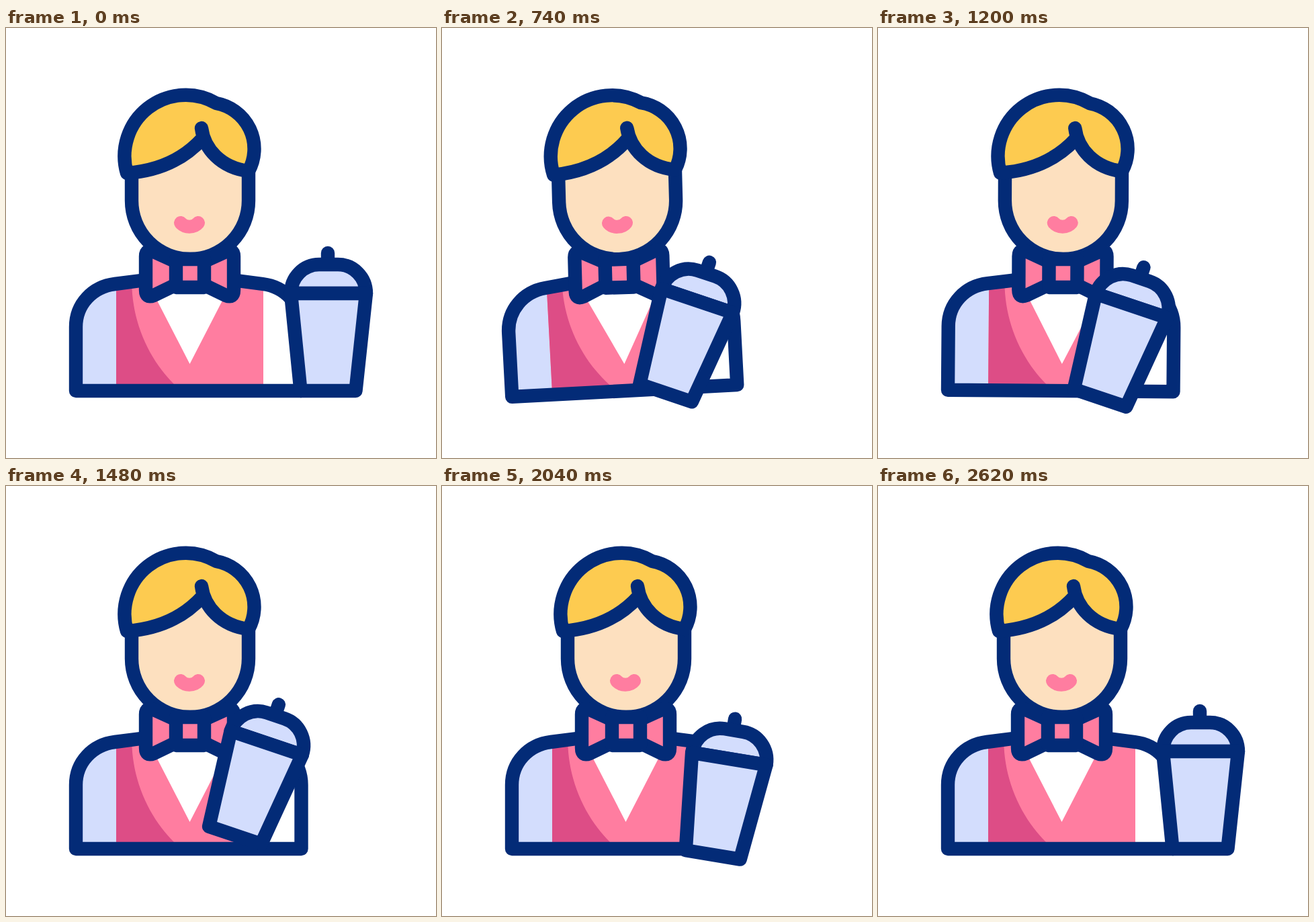
These frames come from a looping animation (640 px wide and 640 px high, 2800 ms). An HTML page:

```html
<!DOCTYPE html>
<html lang="en">
<head>
<meta charset="utf-8">
<title>Bartender</title>
<style>
  html, body { margin: 0; height: 100%; overflow: hidden; background: #fff; }
  svg { display: block; width: 100vw; height: 100vh; }
  path { fill: none; }
  .line { stroke: #032b77; stroke-width: 20.4; stroke-linecap: round; stroke-linejoin: round; }
  .white { fill: #fff; }
  .ice { fill: #d3ddfd; }
  .pink { fill: #ff7da0; }
  .plum { fill: #dd4d86; }
  .skin { fill: #fde0bf; }
  .blond { fill: #fdcb50; }
  .lips { stroke: #ff7da0; stroke-width: 20; stroke-linecap: round; }
</style>
</head>
<body>
<svg viewBox="0 0 640 640">
  <defs>
    <path id="wing" class="line pink" d="M253 348L220 333Q208 328 208 340V390Q208 403 220 398L253 382"/>
    <path id="torso" d="M104 540V445C104 411 129 385 162 381L208 375H336L382 381C415 385 439.500 411 439.500 445V540Z"/>
    <clipPath id="inside">
      <path d="M104 540V445C104 411 129 385 162 381L208 375H336L382 381C415 385 439.500 411 439.500 445V540Z"/>
    </clipPath>
  </defs>

  <g id="body">
    <g clip-path="url(#inside)">
      <path class="white" d="M90 360H450V550H90Z"/>
      <path class="ice" d="M90 360H164V550H90Z"/>
      <path class="pink" d="M164 360H383V550H164Z"/>
      <path class="plum" d="M164 360H187.500V388C190 440 212 492 250 530L260 540H164Z"/>
      <path class="white" d="M204 365L273.500 500L343 365Z"/>
    </g>
    <use href="#torso" class="line"/>

    <g id="head">
      <path class="skin" d="M187 215L292 155L361 215V257A87 87 0 0 1 187 257Z"/>
      <path class="line" d="M187 215V257A87 87 0 0 0 361 257V215"/>
      <path class="lips" d="M260 290C266 297.500 280 297.500 286 290"/>
      <path class="blond" d="M180 216A91 91 0 0 1 313 112A69 69 0 0 1 361 213C320 208 300 185 292 165Q250 211 180 216Z"/>
      <path class="line" d="M291 149C295 180 320 208 361 213A69 69 0 0 0 313 112A91 91 0 0 0 180 216Q250 211 292 165"/>
      <use href="#wing"/>
      <use href="#wing" transform="matrix(-1 0 0 1 547 0)"/>
      <path class="line pink" d="M253 344H295V386H253Z"/>
    </g>
  </g>

  <g id="shaker">
    <path class="line" d="M479 335V350"/>
    <path class="line ice" d="M424 395A42 43 0 0 1 466 352H494A42 43 0 0 1 536 395Z"/>
    <path class="line ice" d="M424 395L438.500 540H520.500L536 395Z"/>
  </g>
</svg>
<script>
const LOOP = 2800;
const part = id => document.getElementById(id);
const body = part('body'), head = part('head'), shaker = part('shaker');

// Each track is a list of [time, value]; values ease in and out between keys.
const lean = [[280, 0], [550, -3.5], [690, -3.5], [940, 1.3], [1370, 0]];
const reach = [[280, 0], [740, 1], [1760, 1], [2325, 0]];
const hop = [[2220, 0], [2420, 79], [2620, 0]];
const shake = [[740, 0]];
for (let i = 0; i < 8; i++) shake.push([836 + 112 * i, i % 2 ? -15 : 31]);
shake.push([1760, -15], [2325, 0]);

function at(track, t) {
  const next = track.findIndex(key => key[0] > t);
  if (next === 0) return track[0][1];
  if (next < 0) return track[track.length - 1][1];
  const [t0, v0] = track[next - 1], [t1, v1] = track[next];
  const k = (1 - Math.cos(Math.PI * (t - t0) / (t1 - t0))) / 2;
  return v0 + (v1 - v0) * k;
}

function draw(t) {
  const tilt = at(lean, t);
  body.setAttribute('transform', `rotate(${tilt} 272 540)`);
  head.setAttribute('transform', `rotate(${-tilt / 2} 273 335)`);

  const m = at(reach, t), s = at(shake, t);
  const x = -143 * m + 0.32 * s;
  const y = 4 * m - 0.95 * s - at(hop, t);
  shaker.setAttribute('transform', `translate(${x} ${y}) rotate(${18.6 * m} 480 529)`);
}

const start = performance.now();
function tick() {
  draw((performance.now() - start) % LOOP);
  requestAnimationFrame(tick);
}
tick();
</script>
</body>
</html>
```
